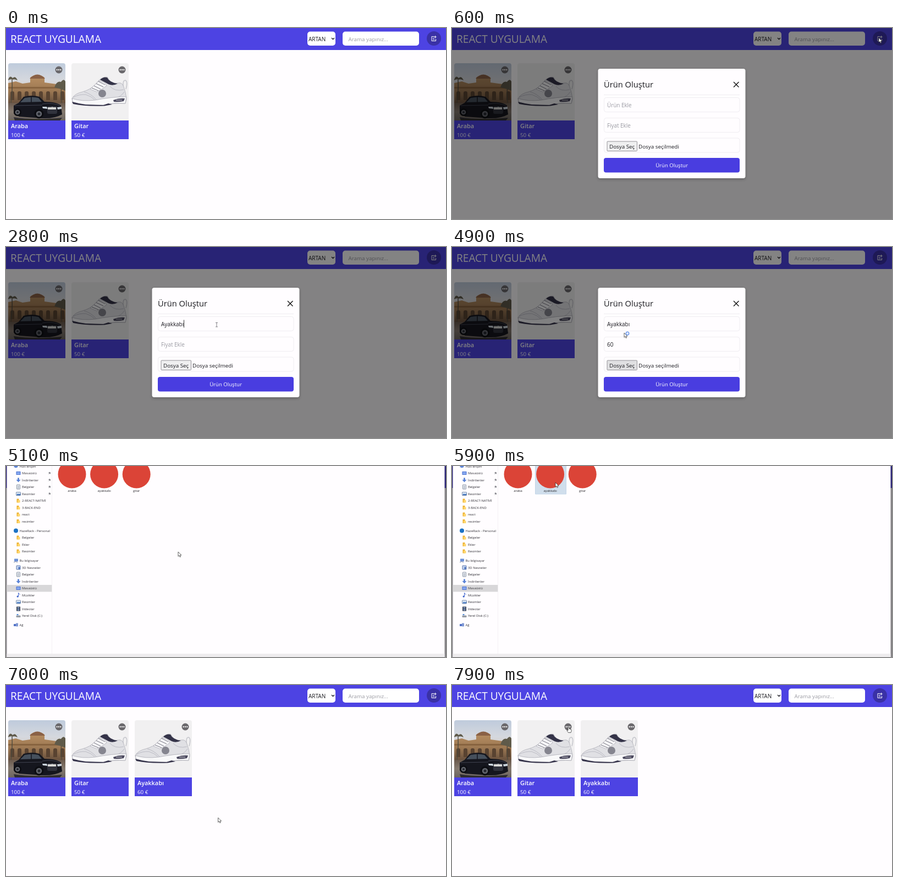
Animation, 800 px wide and 347 px high, one loop 8000 ms. Source, as an HTML page with a canvas:

```html
<!DOCTYPE html>
<html lang="tr">
<head>
<meta charset="utf-8">
<title>React Uygulama</title>
<style>
html, body { margin: 0; width: 100%; height: 100%; overflow: hidden; background: #fffdff; }
canvas { display: block; width: 800px; height: 347px; }
</style>
</head>
<body>
<canvas id="stage"></canvas>
<script>
const W = 800, H = 347, LOOP = 8000;
const INDIGO = '#4d43e3', PAGE = '#fffdff', INK = '#1b1b20', HINT = '#9a9aa2';
const MODAL_OPEN = 500, DIALOG_OPEN = 5000, DIALOG_CLOSE = 6150, MODAL_CLOSE = 6800;

const canvas = document.getElementById('stage');
const ctx = canvas.getContext('2d');
const ratio = window.devicePixelRatio || 1;
canvas.width = W * ratio;
canvas.height = H * ratio;

function rect(x, y, w, h, fill, r = 0, stroke) {
  ctx.beginPath();
  ctx.roundRect(x, y, w, h, r);
  if (fill) { ctx.fillStyle = fill; ctx.fill(); }
  if (stroke) { ctx.strokeStyle = stroke; ctx.lineWidth = 1; ctx.stroke(); }
}

function circle(x, y, r, fill) {
  ctx.beginPath();
  ctx.arc(x, y, r, 0, Math.PI * 2);
  ctx.fillStyle = fill;
  ctx.fill();
}

function path(d, fill, stroke, width = 1) {
  const shape = new Path2D(d);
  if (fill) { ctx.fillStyle = fill; ctx.fill(shape); }
  if (stroke) { ctx.strokeStyle = stroke; ctx.lineWidth = width; ctx.stroke(shape); }
}

function text(str, x, baseline, size, color, weight = 400, align = 'left') {
  ctx.font = `${weight} ${size}px "Open Sans", "Noto Sans", sans-serif`;
  ctx.textAlign = align;
  ctx.fillStyle = color;
  ctx.fillText(str, x, baseline);
  return ctx.measureText(str).width;
}

function at(x, y, draw) {
  ctx.save();
  ctx.translate(x, y);
  draw();
  ctx.restore();
}

function gradient(y0, y1, ...colors) {
  const g = ctx.createLinearGradient(0, y0, 0, y1);
  colors.forEach((c, i) => g.addColorStop(i / (colors.length - 1), c));
  return g;
}

// Product pictures, each 104 by 104
function carPicture() {
  rect(0, 0, 104, 104, gradient(0, 60, '#bfcbdc', '#d5d8de', '#d6c8b6'));
  path('M0 50 V36 L14 33 L26 37 L40 35 V26 Q53 16 66 26 V35 L88 38 L104 35 V80 H0Z', gradient(26, 76, '#b58c60', '#9b7752', '#5f4a3a'));
  path('M39 28 Q53 13 67 28Z', '#8a6146');
  rect(0, 43, 104, 3, '#87633f');
  for (let i = 0; i < 8; i++) rect(4 + i * 13, 51, 7, 16, '#594331', [3, 3, 0, 0]);
  path('M5 72 Q8 50 7 30 M97 72 Q95 50 98 34', null, '#4f4a3e', 1.4);
  path('M0 30 Q3 21 8 27 Q13 22 17 31 Q11 28 8 30 Q4 28 0 31Z', '#5f5a4a');
  path('M84 44 Q88 31 96 34 Q101 27 104 33 V50 Q94 46 84 44Z', '#5f5a4a');
  rect(0, 72, 104, 32, gradient(72, 104, '#6b5a4d', '#857a70', '#6b645f'));
  path('M10 98 Q45 104 98 99 L94 104 H12Z', '#2e2c31');
  path('M10 77 L19 72 L28 61 Q44 57 57 61 L66 70 Q88 70 96 77 L98 93 Q84 101 62 100 L20 97 L10 91Z', '#15161e');
  path('M22 71 L30 63 Q44 60 55 63 L61 70Z', '#46505c');
  path('M42 61 V71', null, '#15161e', 1.5);
  path('M12 77 L62 76 M62 74 Q80 71 94 77', null, '#4c4f5d', .8);
  path('M62 79 L70 79 L72 83 L63 82Z M89 80 L97 79 V83 L90 84Z', '#cbd4dc');
  rect(71, 78, 18, 14, '#30323c', 3);
  circle(80, 80.5, 1.5, '#9da2a8');
  rect(72, 80, 15, 4, '#d8d8d6', .5);
  for (const [x, y, r] of [[17, 89, 7], [56, 92, 8.5]]) {
    circle(x, y, r, '#0c0d12');
    circle(x, y, r * .62, '#62656d');
    circle(x, y, r * .3, '#252830');
  }
}

function shoePicture() {
  rect(0, 0, 104, 104, '#f1f0f1');
  path('M94 42 Q93 31 98 31 Q103 33 99 47', null, '#c8c8ce', 1.6);
  path('M1 64 Q6 55 20 52 Q34 48 42 40 L50 31 Q56 25 65 25 L69 31 Q76 38 85 36 Q92 34 95 43 Q99 53 100 65 L98 73 Q76 72 60 76 Q25 77 3 71Z', '#e0e0e4', '#a8a8b0', .7);
  path('M52 30 Q58 24 65 26 Q69 35 84 37 Q75 42 67 38 Q60 34 52 30Z', '#343348');
  path('M34 47 L50 32 L60 35 L64 41 Q56 47 46 52Z', '#f6f6f8', '#9c9ba6', .6);
  path('M37 45 L49 50 M41 41 L53 47 M45 37 L58 43 M49 33 L61 39', null, '#62616f', .9);
  path('M3 62 Q14 56 26 57 Q36 60 42 66 M23 52 Q35 55 45 66 M70 42 Q79 52 95 48 M80 64 Q91 60 96 52', null, '#b2b2bb', .8);
  circle(56, 55, 7, '#85858f');
  path('M1 64 Q19 70 43 67 Q73 61 100 61 L98 73 Q77 71 60 76 Q25 78 3 72Z', '#f9f9fa', '#a3a3ac', .7);
  path('M1 70 Q12 73 26 75 L58 76 L67 73 L74 75 L60 77.5 Q22 78.5 3 74Z', '#36344b');
  path('M76 67 Q86 63 97 64 L95 69 Q85 71 77 70Z', '#4a485d');
  path('M81 67 H92', null, '#d7d7de', 1.2);
}

function card(x, name, price, picture) {
  at(x, 64, () => {
    ctx.beginPath();
    ctx.roundRect(0, 0, 104, 138, [4, 4, 0, 0]);
    ctx.clip();
    picture();
    rect(0, 104, 104, 34, INDIGO);
    circle(92, 12, 6.5, '#6a686c');
    for (const dx of [-3.3, 0, 3.3]) circle(92 + dx, 12, 1.15, '#fff');
    text(name, 5, 117.5, 10.9, '#fff', 600);
    text(price, 5, 134, 9.8, '#fff');
  });
}

function header() {
  rect(0, 0, W, 40, INDIGO);
  text('REACT UYGULAMA', 8, 27, 19.1, '#fff');
  rect(548, 6.5, 51, 25.5, '#fff', 5);
  text('ARTAN', 550, 23.7, 10, INK);
  path('M592 18 L594.5 20.5 L597 18', null, INK, 1.3);
  rect(612, 6.5, 139, 25.5, '#fff', 5);
  text('Arama yapınız...', 622.5, 23.5, 9.8, HINT);
  circle(778, 19, 13, '#3a31a6');
  path('M778.5 15.5 H774 V23.5 H781.5 V20 M776 18.5 H778.5 M776 21 H779.5 M780.5 14 V18.5 M778.3 16.2 H782.8', null, '#fff', 1);
}

function page(t) {
  rect(0, 0, W, H, PAGE);
  header();
  card(4, 'Araba', '100 €', carPicture);
  card(119, 'Gitar', '50 €', shoePicture);
  if (t >= MODAL_CLOSE) card(234, 'Ayakkabı', '60 €', shoePicture);
}

function typed(str, t, start, step) {
  return str.slice(0, Math.max(0, Math.floor((t - start) / step)));
}

function field(y, value, hint, caretOn) {
  rect(276.5, y, 246.5, 26, PAGE, 4, '#efedf1');
  const width = text(value || hint, 282, y + 17.3, 9.9, value ? INK : HINT);
  if (caretOn) rect(282 + (value ? width : 0), y + 6, .9, 14, '#222');
}

function modal(t) {
  rect(0, 0, W, H, 'rgba(0,0,0,.486)');
  ctx.save();
  ctx.shadowColor = 'rgba(0,0,0,.25)';
  ctx.shadowBlur = 5 * ratio;
  ctx.shadowOffsetY = 2 * ratio;
  rect(265.5, 74, 268, 199, PAGE, 4);
  ctx.restore();

  text('Ürün Oluştur', 276, 108, 14.7, INK);
  path('M512 98 L521.5 107.5 M521.5 98 L512 107.5', null, '#111', 1.4);
  rect(276, 121, 247, 1, '#eeecf0');

  const blink = start => (t - start) % 1000 < 530;
  field(126.5, typed('Ayakkabı', t, 1700, 120), 'Ürün Ekle', t > 1500 && t < 3250 && (t > 1700 && t < 2660 || blink(1660)));
  field(163.5, typed('60', t, 3300, 200), 'Fiyat Ekle', t > 3250 && t < 4450 && blink(3700));
  field(200, '', '', false);
  const pressed = t > 4450 && t < DIALOG_OPEN;
  rect(282, 206, 54.5, 17.5, pressed ? '#e0e0e2' : '#efeff0', 1, '#949297');
  text('Dosya Seç', 286, 218.5, 9.8, INK);
  text(t < DIALOG_CLOSE ? 'Dosya seçilmedi' : 'ayakkabı.webp', 339, 218.5, 9.85, INK);
  rect(276, 236, 247, 26.5, '#493de0', 4);
  text('Ürün Oluştur', 399.5, 253.3, 9.6, '#fff', 500, 'center');
}

// Sidebar icons are drawn around their centre
const BLUE = '#5b83d6';
const icons = {
  star: () => path('M-4 1 L0 -4 L4 1 L0 3Z', BLUE),
  desk: () => { rect(-4, -3, 8, 6, '#4a6fd0', .5); rect(-3, -2, 6, 4, '#86a8ef'); },
  down: () => path('M-1.4 -4 H1.4 V-.5 H4 L0 4 L-4 -.5 H-1.4Z', BLUE),
  doc: () => { rect(-3, -4, 6, 8, '#f2f4f7', .5, '#8b95a5'); path('M-1.5 -1.5 H1.5 M-1.5 .5 H1.5 M-1.5 2.3 H1', null, '#6d7d97', .7); },
  image: () => { rect(-4, -3, 8, 6, '#dbe7f6', .5, '#8092ae'); path('M-3.5 2.5 L-1 -.5 L1 1 L3.5 -.5 V2.5Z', '#3d71bd'); },
  folder: () => { rect(-3, -3.5, 4, 7, '#eeb435', .5); rect(-1.5, -1, 4.5, 4.5, '#ffd66c', .5); },
  disc: () => circle(0, 0, 4, '#1c72c4'),
  pc: () => { rect(-3, -3.5, 7, 5, '#6d92d8', .5); path('M-4 3 L0 1.5 L3 3.5', null, '#8792a8', 1); },
  cube: () => { rect(-3.5, -3.5, 7, 7, '#c6d6ef', .5, '#6078ae'); rect(0, -1, 3, 4, '#4770bd'); },
  music: () => { path('M0 2.5 V-4 Q1 -2 3 -1', null, '#4166cd', 1); circle(-1.3, 2.6, 1.7, '#4166cd'); },
  film: () => { rect(-3.5, -4, 7, 8, '#39414f', .5); rect(-2, -3, 4, 2.5, '#7892c0'); rect(-2, .5, 4, 2.5, '#7892c0'); },
  disk: () => { rect(-4, -.5, 8, 3.5, '#969ba4', 1); rect(-3, -3, 3, 2, '#4f88d5'); },
  net: () => { rect(-4, -2, 5, 4, '#5272c6', .5); rect(0, -3.5, 4, 6, '#8199d5', .5); }
};

const groups = [
  [.5, 'star|Hızlı erişim', 'desk|Masaüstü', 'down|İndirilenler', 'doc|Belgeler', 'image|Resimler',
    'folder|2-REACT-NATİVE', 'folder|3-BACK-END', 'folder|react', 'folder|resimler'],
  [117.5, 'disc|HazeRack - Personal', 'folder|Belgeler', 'folder|Ekler', 'folder|Resimler'],
  [172, 'pc|Bu bilgisayar', 'cube|3D Nesneler', 'doc|Belgeler', 'down|İndirilenler', 'desk|Masaüstü',
    'music|Müzikler', 'image|Resimler', 'film|Videolar', 'disk|Yerel Disk (C:)'],
  [289, 'net|Ağ']
];

function fileDialog(t) {
  rect(0, 0, W, H, '#858386');
  rect(0, 0, W, 40, '#2b2576');
  rect(1.5, 0, 796, H, PAGE);
  rect(1.5, 341, 796, 6, '#eeecee');
  rect(1.5, 216, 82, 12.5, '#d8d7d9');
  rect(83, 0, .6, 341, '#eceaee');
  groups.forEach(([top, ...rows], g) => rows.forEach((row, i) => {
    const [icon, label] = row.split('|');
    const y = top + i * 12.5;
    at(i ? 22.5 : 18, y, icons[icon]);
    text(label, i ? 29 : 24.5, y + 2.1, 5.9, '#333238');
    if (g === 0 && i > 0 && i < 5) path(`M77 ${y + 2} L79 ${y} M77.5 ${y - 1} L80 ${y + 1.5} L81 ${y - .5} L79.5 ${y - 2}Z`, '#85858b', '#85858b', .6);
  }));
  if (t > 5500) rect(151.5, -5, 56, 56, '#d0deec', 0, '#c3d5e8');
  ['araba', 'ayakkabı', 'gitar'].forEach((name, i) => {
    const x = 120 + i * 58.6;
    circle(x, 15, 25.5, '#db4437');
    text(name, x, 47, 5.9, '#28272c', 400, 'center');
  });
}

// Pointer stops: time, x, y
const stops = [
  [200, 690, 75], [450, 776, 18], [700, 776, 18], [1350, 383, 141], [2900, 383, 141],
  [3200, 376, 178], [4150, 376, 178], [4420, 310, 214], [4600, 310, 214], [4800, 313, 156],
  [5100, 313, 156], [5600, 188, 30], [6150, 188, 30], [6600, 396, 251], [6900, 396, 251],
  [7600, 212, 76], [LOOP, 212, 76]
];

function pointerAt(t) {
  const i = stops.findIndex(s => s[0] > t);
  if (i < 1) return null;
  const [t0, x0, y0] = stops[i - 1], [t1, x1, y1] = stops[i];
  const u = (t - t0) / (t1 - t0), e = u * u * (3 - 2 * u);
  return [x0 + (x1 - x0) * e, y0 + (y1 - y0) * e];
}

function pointerShape(t, x, y) {
  const inside = (l, top, r, b) => x > l && x < r && y > top && y < b;
  if (t >= DIALOG_OPEN && t < DIALOG_CLOSE) return 'arrow';
  if (t >= MODAL_OPEN && t < MODAL_CLOSE) {
    if (t > 4620 && t < DIALOG_OPEN) return 'busy';
    if (inside(276, 126, 523, 153) || inside(276, 163, 523, 190)) return 'beam';
    return inside(276, 236, 523, 263) ? 'hand' : 'arrow';
  }
  return inside(765, 6, 791, 32) || inside(204, 69, 218, 83) ? 'hand' : 'arrow';
}

const pointers = {
  arrow: () => path('M0 0 V8.2 L1.9 6.5 L3.2 9.4 L4.6 8.8 L3.4 6 H6Z', '#fff', '#222', .7),
  busy: () => {
    pointers.arrow();
    ctx.beginPath();
    ctx.arc(6, 1, 2.7, 0, Math.PI * 2);
    ctx.strokeStyle = '#6f9bea';
    ctx.lineWidth = 1.6;
    ctx.stroke();
  },
  beam: () => path('M-2 -3.5 H2 M0 -3.5 V4 M-2 4 H2', null, '#77757c', .9),
  hand: () => path('M-1 1 Q0 -1 1 1 V4 Q2.4 3 3 4.5 Q5 4 5 6 V8 L4 10.5 H-.5 L-3 7 Q-3 5 -1 6.5Z', '#fff', '#222', .7)
};

function render(t) {
  ctx.setTransform(ratio, 0, 0, ratio, 0, 0);
  if (t >= DIALOG_OPEN && t < DIALOG_CLOSE) {
    fileDialog(t);
  } else {
    page(t);
    if (t >= MODAL_OPEN && t < MODAL_CLOSE) modal(t);
  }
  const pos = pointerAt(t);
  if (pos) at(...pos, pointers[pointerShape(t, ...pos)]);
}

const start = performance.now();
function tick() {
  render((performance.now() - start) % LOOP);
  requestAnimationFrame(tick);
}
tick();
</script>
</body>
</html>
```
